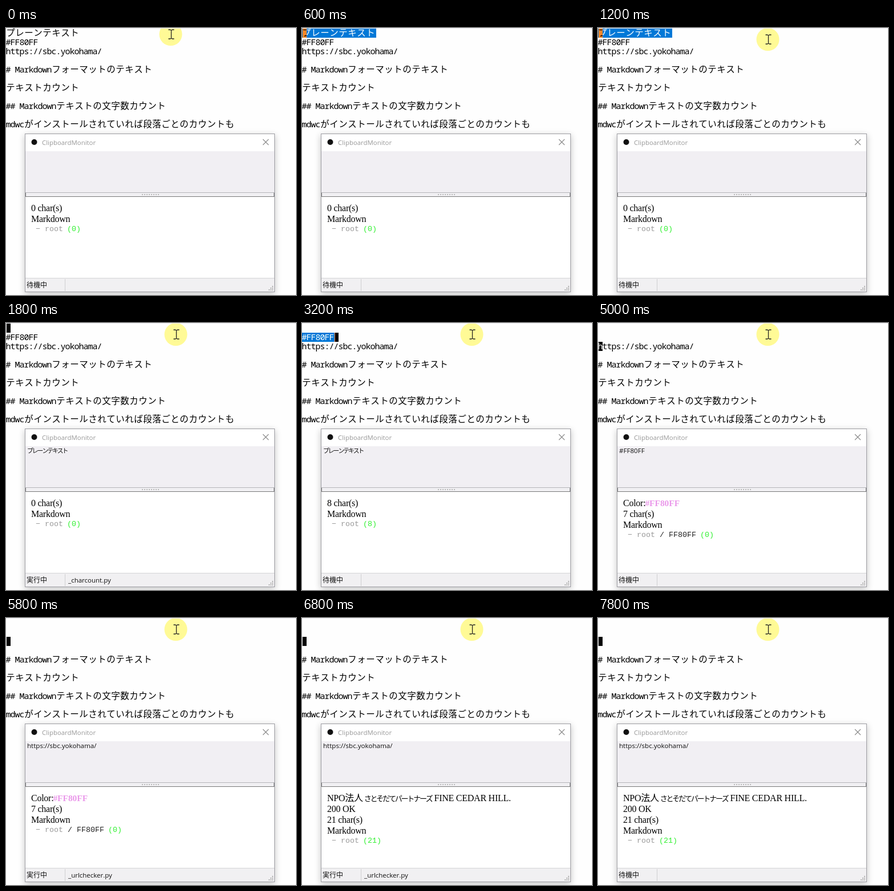
An HTML page with a canvas for the animation above (8 s loop, 508x468 px).

```html
<!DOCTYPE html>
<html lang="ja">
<head>
<meta charset="utf-8">
<title>Clipboard monitor</title>
<style>
html, body { margin: 0; width: 100%; height: 100%; overflow: hidden; background: #fefefe; }
canvas { display: block; }
</style>
</head>
<body>
<canvas id="stage" width="508" height="468"></canvas>
<script>
const ctx = document.getElementById('stage').getContext('2d');
const LOOP = 8000;
const ROW = 16;

const CJK = '"Noto Sans CJK JP", "Noto Sans CJK", sans-serif';
const CODE = '"Noto Sans Mono", monospace';
const MONO = '"Liberation Mono", monospace';
const SERIF = '"Liberation Serif", "Noto Sans CJK JP", serif';
const UI = '"Open Sans", "Noto Sans CJK JP", sans-serif';

const lines = [
  'プレーンテキスト', '#FF80FF', 'https://sbc.yokohama/', '',
  '# Markdownフォーマットのテキスト', '', 'テキストカウント', '',
  '## Markdownテキストの文字数カウント', '',
  'mdwcがインストールされていれば段落ごとのカウントも'
];

// Each step changes only the named parts of the state.
const steps = [
  [0, { pointer: [289, 11], caret: null, selected: -1, cut: 0, clip: '', result: 'empty', script: '' }],
  [200, { pointer: [287, -7] }],
  [400, { pointer: null, caret: [0, 0] }],
  [600, { selected: 0 }],
  [1000, { pointer: [299, 0] }],
  [1200, { pointer: [298, 20] }],
  [1400, { selected: -1, cut: 1, clip: lines[0] }],
  [1600, { script: '_charcount.py' }],
  [2200, { caret: null, script: '_urlchecker.py' }],
  [2600, { caret: [0, 0], result: 'plain', script: '' }],
  [2800, { caret: [1, 0] }],
  [3000, { caret: [1, 7], selected: 1 }],
  [3600, { caret: null }],
  [3800, { selected: -1, cut: 2 }],
  [4000, { clip: lines[1], script: '_charcount.py' }],
  [4200, { caret: [1, 0] }],
  [4400, { script: '_urlchecker.py' }],
  [5000, { caret: [2, 0], result: 'color', script: '' }],
  [5200, { caret: [2, 21], selected: 2 }],
  [5600, { caret: [2, 0], selected: -1, cut: 3, clip: lines[2], script: '_charcount.py' }],
  [5800, { script: '_urlchecker.py' }],
  [6200, { caret: null }],
  [6800, { caret: [2, 0], result: 'url' }],
  [7000, { script: '' }],
  [7400, { caret: null }],
  [7800, { caret: [2, 0] }]
];

const results = {
  empty: { head: ['0 char(s)'], count: 0 },
  plain: { head: ['8 char(s)'], count: 8 },
  color: { head: ['Color:', '7 char(s)'], path: ' / FF80FF', count: 0 },
  url: { head: ['NPO法人', '200 OK', '21 char(s)'], count: 21 }
};

function stateAt(time) {
  const state = {};
  for (const [start, patch] of steps) if (start <= time) Object.assign(state, patch);
  return state;
}

function rect(x, y, w, h, color) {
  ctx.fillStyle = color;
  ctx.fillRect(x, y, w, h);
}

// Returns the x position after the text.
function write(str, x, y, font, color = '#000', spacing = 0) {
  ctx.font = font;
  ctx.letterSpacing = spacing + 'px';
  ctx.fillStyle = color;
  ctx.fillText(str, x, y);
  const end = x + ctx.measureText(str).width;
  ctx.letterSpacing = '0px';
  return end;
}

const isNarrow = ch => ch < '\u0100';
const cellWidth = ch => isNarrow(ch) ? 8 : 16;
const textWidth = str => [...str].reduce((sum, ch) => sum + cellWidth(ch), 0);

function writeGrid(str, row, color) {
  let x = 0;
  ctx.textAlign = 'center';
  for (const ch of str) {
    const w = cellWidth(ch);
    const font = isNarrow(ch) ? `300 semi-condensed 15px ${CODE}` : `300 15.5px ${CJK}`;
    write(ch, x + w / 2, row * ROW + 14, font, color);
    x += w;
  }
  ctx.textAlign = 'left';
}

function drawEditor({ caret, selected, cut }) {
  rect(0, 0, 508, 1, '#f0f0f5');
  lines.forEach((line, row) => {
    if (row < cut) return;
    const active = row === selected;
    if (active) rect(0, row * ROW + 1, textWidth(line) + 2, ROW, '#0078d7');
    writeGrid(line, row, active ? '#fff' : '#000');
  });
  if (caret) {
    // The block caret inverts what lies under it.
    const [row, col] = caret;
    ctx.globalCompositeOperation = 'difference';
    rect(col * 8 + 1, row * ROW + 1, 7, ROW, '#fff');
    ctx.globalCompositeOperation = 'source-over';
  }
}

function drawPointer([x, y]) {
  ctx.fillStyle = '#fffa96';
  ctx.beginPath();
  ctx.arc(x - 0.5, y, 20, 0, Math.PI * 2);
  ctx.fill();
  ctx.beginPath();
  for (const dir of [-1, 1]) {
    const end = y + dir * 8;
    ctx.moveTo(x - 4.5, end);
    ctx.lineTo(x - 1.5, end);
    ctx.lineTo(x + 0.5, end - dir);
    ctx.lineTo(x + 2.5, end);
    ctx.lineTo(x + 5.5, end);
  }
  ctx.moveTo(x + 0.5, y - 7);
  ctx.lineTo(x + 0.5, y + 7);
  ctx.strokeStyle = '#222';
  ctx.lineWidth = 1.3;
  ctx.stroke();
}

function drawWindow() {
  ctx.save();
  ctx.shadowColor = 'rgba(0, 0, 0, 0.24)';
  ctx.shadowBlur = 11;
  ctx.shadowOffsetY = 3;
  rect(33, 185, 438, 278, '#9c9ca2');
  ctx.restore();
  rect(34, 186, 436, 276, '#fff');

  ctx.fillStyle = '#111';
  ctx.beginPath();
  ctx.arc(49.5, 200, 5, 0, Math.PI * 2);
  ctx.fill();
  write('ClipboardMonitor', 63, 205, `11.4px ${UI}`, '#999');
  ctx.strokeStyle = '#888';
  ctx.lineWidth = 1.1;
  ctx.beginPath();
  ctx.moveTo(450, 195);
  ctx.lineTo(460, 205);
  ctx.moveTo(460, 195);
  ctx.lineTo(450, 205);
  ctx.stroke();

  rect(34, 216, 436, 72, '#f1eff3');
  rect(34, 288, 436, 8, '#777');
  rect(34, 288, 436, 1, '#b4b4b8');
  rect(35, 289, 434, 6, '#f1f0f3');
  for (let x = 238; x < 267; x += 4) rect(x, 291, 2, 2, '#bbb');

  rect(34, 438, 436, 24, '#f1f0f2');
  rect(34, 438, 436, 1, '#d4d4d6');
  rect(103, 440, 1, 21, '#cfcfd1');
  for (let row = 0; row < 3; row++) {
    for (let col = 0; col <= row; col++) rect(466 - col * 3, 452 + row * 3, 2, 2, '#b4b4b4');
  }
}

function drawResult(name) {
  const { head, path = '', count } = results[name];
  const serif = (str, x, y) => write(str, x, y, `16px ${SERIF}`, '#000', -0.25);
  let y = 321;
  head.forEach((str, i) => {
    const end = serif(str, 44, y);
    if (i === 0 && name === 'color') write('#FF80FF', end - 1, y, `bold 15.4px ${SERIF}`, '#ea98ea');
    if (i === 0 && name === 'url') {
      const next = write('さとそだてパートナーズ', end + 2, y, `300 13px ${CJK}`, '#000', -2.2);
      serif('FINE CEDAR HILL.', next + 4, y);
    }
    y += 19;
  });
  serif('Markdown', 44, y);
  y += 16;
  const mono = `13.33px ${MONO}`;
  let x = write('\u2212 root', 52, y, mono, '#999');
  if (path) x = write(path, x, y, mono, '#222');
  write(`(${count})`, x + 7, y, mono, '#30f030');
}

function drawClip(str) {
  if (!str) return;
  if (isNarrow(str[0])) write(str, 37, 228, `11.6px ${UI}`, '#111');
  else write(str, 37, 228, `10.8px ${CJK}`, '#111', -2);
}

function drawStatus(script) {
  write(script ? '実行中' : '待機中', 36, 455, `12px ${CJK}`, '#111');
  write(script, 109, 455, `11.5px ${UI}`, '#111');
}

function draw(time) {
  const state = stateAt(time);
  rect(0, 0, 508, 468, '#fefefe');
  if (state.pointer) drawPointer(state.pointer);
  drawEditor(state);
  drawWindow();
  drawClip(state.clip);
  drawResult(state.result);
  drawStatus(state.script);
}

const begin = performance.now();

function frame(now) {
  draw(Math.max(0, now - begin) % LOOP);
  requestAnimationFrame(frame);
}

requestAnimationFrame(frame);
</script>
</body>
</html>
```
